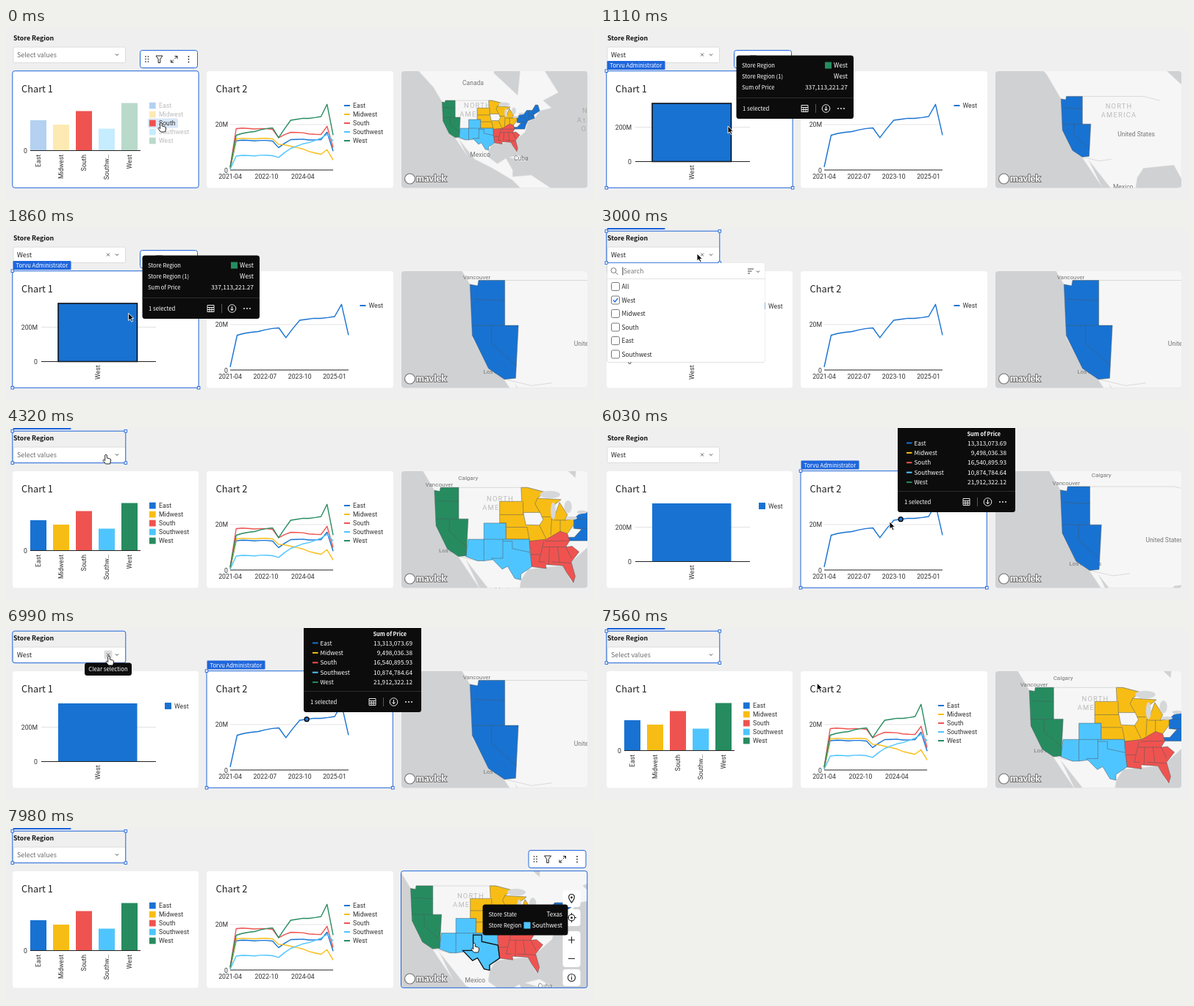
Recreate the animation shown at these times as an HTML page. Size 800x235 px, loop 8000 ms.

```html
<!DOCTYPE html>
<html lang="en">
<head>
<meta charset="utf-8">
<title>Dashboard filters</title>
<style>
html, body { margin: 0; width: 100%; height: 100%; overflow: hidden; background: #efefef; }
svg { display: block; width: 800px; height: 235px; }
text { font-family: "Noto Sans CJK SC", "Noto Sans CJK JP", "Noto Sans CJK", "Noto Sans", sans-serif; }
.r { font-family: Roboto, Arial, sans-serif; }
</style>
</head>
<body>
<svg viewBox="0 0 800 235">
  <defs><clipPath id="mapClip"><rect x="538" y="59" width="253" height="159.5" rx="4"/></clipPath></defs>
  <g id="scene"></g>
</svg>
<script>
const LOOP = 8000, BLUE = '#1f66dc', INK = '#222', DARK = '#0c0c0c';
const END = 'text-anchor="end"', MID = 'text-anchor="middle"', BOLD = 'font-weight="700"';

// Lines bend only at the shared stops (quarters since 2021-04)
const stops = [0, 1, 7, 8, 10, 15, 16, 17];
const regions = [
  { name: 'East', color: '#1872d2', bar: 126, total: '13,313,073.69', line: [192, 153.5, 154, 163.5, 152, 153, 142, 168],
    edge: '-83.7 36.6 -75.9 36.6 -75.2 38.5 -74 40.5 -70 41.6 -70.6 43.1 -67 44.8 -68 47.2 -69.5 47.3 -71.4 45 -74.7 45 -76.3 43.5 -79 43 -80.5 42 -80.5 39.7 -78 39.5 -80.3 37.5 -82 37.5',
    cuts: ['-80 39.7 -75.5 39.7 -74.7 41.3 -75.3 42 -79.7 42', '-73.5 45 -73.5 41', '-73.4 42.7 -70.8 42.8 -71.2 45.2'] },
  { name: 'Midwest', color: '#f8bd14', bar: 132, total: '9,498,036.38', line: [192, 151, 151, 159, 161, 173, 166, 180],
    edge: '-104 46 -97 46 -97.2 49 -95.2 49 -89.6 48 -92 46.7 -84.5 46.4 -87 45 -87.5 41.7 -86.4 43 -85 45.8 -82.5 43 -83.3 41.7 -80.5 42 -80.5 40.6 -82.4 38.5 -89.4 36.5 -94.6 36.5 -94.6 37 -102 37 -102 41 -104 41',
    cuts: ['-104 43 -96.5 43 -96.6 46', '-102 40 -95.3 40 -94.6 37', '-92 46.7 -92.8 45.5 -91.2 43.5', '-90.6 42.5 -87.8 42.5', '-91.4 40.5 -89.2 37', '-87.5 41.7 -87.8 38', '-84.8 41.7 -84.8 39', '-87 41.7 -83 41.7'] },
  { name: 'South', color: '#ef5350', bar: 113.5, total: '16,540,895.93', line: [190, 137, 138, 150, 142, 146, 134, 163],
    edge: '-94.6 36.5 -89.2 37 -84.8 39 -82.5 38.4 -81.8 36.6 -83 35 -81 35.2 -78.8 33.7 -81.3 31 -80 27 -80.6 25.2 -82.7 28 -84 30 -89.4 30.3 -89.2 29.2 -93.8 29.7',
    cuts: ['-94.4 33 -91.1 33', '-90 36.5 -91.5 31 -89.7 31', '-90.3 35 -83 35', '-89.5 36.5 -82 36.6', '-88.2 35 -88.4 30.3', '-85.6 35 -85 31', '-87.5 31 -81.3 30.7', '-83 35 -81.2 32'] },
  { name: 'Southwest', color: '#4fc5ff', bar: 137.5, total: '10,874,784.64', line: [193, 174.5, 174, 177, 164, 151, 145, 154],
    edge: '-114 37 -109 37 -109 41 -102 41 -102 37 -94.6 37 -94.4 33.6 -103 32 -109 31.3 -111 31.3 -114.8 32.5',
    cuts: ['-102 37 -109 37 -109 31.3', '-103 37 -103 36.5'] },
  { name: 'West', color: '#268c5f', bar: 102.5, total: '21,912,322.12', line: [190, 146, 136, 150, 125.5, 121.5, 104, 146],
    edge: '-124.7 48.4 -123 48.2 -122.8 49 -117 49 -117 42 -114 42 -114.6 32.7 -117.1 32.5 -120.6 34.5 -124.2 40.3',
    cuts: ['-124 46.2 -119 46 -117 46', '-124.3 42 -117 42', '-120 42 -120 39 -114.4 35'] }
];
const WEST = regions[4], AQUA = regions[3].color, FILTERED = regions[0].color;
const texas = '-103 36.5 -100 36.5 -100 34.6 -94.4 33.6 -93.8 29.7 -97.3 27.6 -97.3 26 -99.2 26.4 -101.5 29.8 -103.2 29 -106.6 32 -103 32';
const iowa = '-96.5 43.5 -91.2 43.5 -90.2 41.8 -91.4 40.5 -95.7 40.6';
const land = '-158 57 -152 60 -140 60 -130 54 -124.7 48.4 -124.2 40 -120.6 34.5 -117.2 32.5 -110 23 -114.7 31.5 -105.5 21 -95 16 -83 9 -78 4 -60 4 -72 12 -83 11 -83 15 -87 21.5 -92 18.5 -97.8 22.5 -97.2 26 -95 29 -84 30 -81 25.2 -81.3 31 -75.6 35.3 -74 40 -70 41.5 -67 44.8 -60 46 -65 49 -56 52 -65 60 -78 62 -80 51 -94 58.5 -95 72 -130 70';
const cuba = '-85 22 -80 23.2 -74.5 20.2 -78 20';
const borders = ['-122.8 49 -95 49 -89 48', '-117 32.5 -111 31.3 -106.6 31.8'];
const lakes = [[-88, 47.5, 3.2, .9], [-87, 43.9, .8, 2], [-82.3, 44.8, 1.2, 1.5], [-81.2, 42.2, 1.8, .4], [-77.9, 43.6, 1.6, .4]];

const rect = (x, y, w, h, fill, more = '') => `<rect x="${x}" y="${y}" width="${w}" height="${h}" fill="${fill}" ${more}/>`;
const text = (x, y, s, size, fill = INK, more = '') => `<text x="${x}" y="${y}" font-size="${size}" fill="${fill}" ${more}>${s}</text>`;
const path = (d, stroke, w = 1, fill = 'none', more = '') => `<path d="${d}" stroke="${stroke}" stroke-width="${w}" fill="${fill}" ${more}/>`;
const dot = (x, y, r, fill, more = '') => `<circle cx="${x}" cy="${y}" r="${r}" fill="${fill}" ${more}/>`;
const dots = (n, x, y, dx, dy, fill) => Array.from({ length: n }, (_, i) => dot(x + i * dx, y + i * dy, .9, fill)).join('');
const chart = (x, y, s, more = '', fill = '#333', size = 8.7) => text(x, y, s, size, fill, 'class="r" ' + more);
const chevron = (x, y) => path(`M${x - 2} ${y - 1}l2 2 2 -2`, '#444');
const box = (x, y, w, h) => rect(x, y, w, h, DARK, 'rx="3.5"');

const linear = u => u;
const smooth = u => u * u * (3 - 2 * u);
const easeOut = u => 1 - (1 - u) ** 3;
// Eased interpolation over rows of [time, ...values]
function track(keys, t, ease) {
  let i = 0;
  while (i < keys.length - 2 && t >= keys[i + 1][0]) i++;
  const [a, b] = [keys[i], keys[i + 1]];
  const u = ease(Math.min(1, Math.max(0, (t - a[0]) / (b[0] - a[0]))));
  return a.slice(1).map((v, n) => v + (b[n + 1] - v) * u);
}

function outline(x, y, w, h, handles) {
  let s = rect(x, y, w, h, 'none', `rx="${handles ? 0 : 3}" stroke="${BLUE}"`);
  if (handles) for (const a of [x, x + w]) for (const b of [y, y + h])
    s += rect(a - 1.8, b - 1.8, 3.6, 3.6, '#fff', `stroke="${BLUE}" stroke-width=".9"`);
  return s;
}
const card = (x, handles) => outline(x, 58.7, 253.3, 159.6, handles);
const tag = (x, y) => rect(x, y, 79, 12, BLUE, 'rx="1"') + text(x + 4, y + 9, 'Torvu Administrator', 7.6, '#fff');

function toolbar(x) {
  return rect(x, 30.5, 78, 24, '#fff', `rx="3" stroke="${BLUE}"`) +
    dots(3, x + 7.5, 39, 0, 3.5, '#555') + dots(3, x + 11, 39, 0, 3.5, '#555') +
    path(`M${x + 21.5} 38h9l-3.2 4.5v5h-2.6v-5z`, INK) +
    path(`M${x + 47} 38.5h3.5v3.5m0 -3.5l-3.5 3.5M${x + 42} 43.5v3.5h3.5m-3.5 0l3.5 -3.5`, INK) +
    dots(3, x + 66, 39, 0, 3.7, INK);
}

function footer(x, y) {
  return rect(x, y - 18, 160, .6, '#444') + text(x + 9, y, '1 selected', 7.8, '#fff') +
    path(`M${x + 89} ${y - 7.5}h9v9h-9zm0 3h9m-9 3h9m-6 -3v6m3 -6v6`, '#fff', .9) +
    rect(x + 108, y - 9, .7, 12, '#777') + dot(x + 122.5, y - 3, 5.3, 'none', 'stroke="#fff" stroke-width=".9"') +
    path(`M${x + 122.5} ${y - 6}v5.5m-2.2 -2l2.2 2 2.2 -2`, '#fff') + dots(3, x + 139, y - 3, 4, 0, '#fff');
}

function barTip(pinned) {
  let s = box(185.5, 37.5, 159.5, pinned ? 86.5 : 52) + rect(306, 46.5, 9, 9, WEST.color);
  [['Store Region', 'West'], ['Store Region (1)', 'West'], ['Sum of Price', '337,113,221.27']].forEach(([k, v], i) => {
    const y = 54 + i * 14.8;
    s += text(193, y, k, 7.6, '#fff') + text(337, y, v, 8.4, '#fff', END);
  });
  return s + (pinned ? footer(185, 113) : '');
}

function lineTip(pinned) {
  const dy = pinned ? -30 : 0, w = pinned ? 160 : 136;
  let s = box(405, 8 + dy, w, pinned ? 137 : 109);
  s += text(417, 22 + dy, 'Quarter of Date', 7.4, '#fff', BOLD) + text(478, 22 + dy, '2024-01', 8.2, '#fff');
  s += text(385 + w, 41 + dy, 'Sum of Price', 7.4, '#fff', BOLD + ' ' + END);
  regions.forEach((r, i) => {
    const y = 53.5 + dy + i * 13.4;
    s += rect(417, y - 4, 7.5, 2, r.color) + text(427.5, y, r.name, 8.1, '#fff') + text(393 + w, y, r.total, 8.3, '#fff', END);
  });
  return s + (pinned ? footer(405, 104) : '');
}

function barChart(west, legendHover, picked) {
  let s = text(21, 88, 'Chart 1', 12.8);
  const label = (x, y, n) => chart(0, 0, n, `${END} transform="translate(${x} ${y}) rotate(-90)"`);
  if (west) return s + rect(48, 135, 156, .8, '#ddd') + chart(43, 138.5, '200M', END) + chart(43, 185.5, '0', END) +
    rect(71, 103, 107.5, 79.5, FILTERED, picked ? 'stroke="#080808" stroke-width="1.5"' : '') +
    rect(48, 182, 156, 1, INK) + label(128, 187.5, 'West') + rect(216, 102, 9, 9, FILTERED) + chart(229, 109.5, 'West');
  regions.forEach((r, i) => {
    const x = 33 + i * 31, y = 106 + i * 12, lit = legendHover && r.name === 'South';
    const o = legendHover && !lit ? 'opacity=".32"' : '';
    s += rect(x, r.bar, 22, 167.5 - r.bar, r.color, o) + label(x + 14, 173, r.name.length > 8 ? 'Southw…' : r.name);
    if (lit) s += rect(193, y - 6.5, 41, 13, '#d8e7f8', 'rx="2"');
    s += rect(195, y - 4.3, 8.7, 8.7, r.color, o) + chart(208, y + 3.2, r.name, o);
  });
  return s + rect(33, 167, 150, 1, INK) + chart(29, 171, '0', END);
}

function lineChart(west, hover, picked) {
  const step = west ? 9.47 : 8.24, span = step * 17, X = i => 305 + i * step;
  let s = text(285.5, 88, 'Chart 2', 12.8);
  s += rect(305, 131.5, span, .8, '#ddd') + chart(302, 135, '20M', END) + chart(302, 197.5, '0', END) + rect(305, 193.5, span, 1, INK);
  const ticks = west ? ['2021-04', '2022-07', '2023-10', '2025-01'] : ['2021-04', '2022-10', '2024-04'];
  ticks.forEach((d, i) => s += chart(X(i * (west ? 5 : 6)), 206, d, MID));
  if (hover) s += rect(395.2, 100, .9, 94, '#666');
  regions.forEach((r, i) => {
    if (west && r !== WEST) return;
    const keys = stops.map((q, n) => [q, r.line[n]]), Y = q => track(keys, q, linear)[0] + .5 * Math.sin(q * 2);
    const c = west ? FILTERED : r.color, y = west ? 106 : 106 + i * 12, lx = west ? 481.5 : 460;
    const pts = Array.from({ length: 18 }, (_, q) => X(q).toFixed(1) + ' ' + Y(q).toFixed(1));
    s += path('M' + pts.join('L'), c, 1.4, 'none', 'stroke-linejoin="round"');
    s += rect(lx, y - 1, 8, 2, c) + chart(lx + 12, y + 3.2, r.name);
    if (hover) s += dot(X(11), Y(11), 3.3, c);
    if (picked) s += dot(X(11), Y(11), 3, c, 'stroke="#000" stroke-width="1.3"');
  });
  return s;
}

// Camera: zoomed-out poses fly to the west coast as depth goes from 0 to 1
const wide = { k: 2.3, lon: -93.8, m: 39 }, full = { k: 3.92, lon: -95.62, m: 41.06 }, coast = { k: 6.15, lon: -119.3, m: 45.4 };
const depthKeys = [[970, 0], [1650, 1], [4000, 1], [4770, 0], [5860, 0], [6460, 1], [7340, 1], [7880, 0]];
function camera(t) {
  const from = t < 2000 ? wide : full, [p] = track(depthKeys, t, easeOut), pan = 1 - (1 - p) ** 2.5;
  return {
    k: from.k * (coast.k / from.k) ** p,
    lon: from.lon + (coast.lon - from.lon) * pan,
    m: from.m + (coast.m - from.m) * pan
  };
}
const merc = d => Math.log(Math.tan((45 + d / 2) * Math.PI / 180)) * 180 / Math.PI;

function mapView(t, west, hover) {
  const { k, lon, m } = camera(t);
  const X = l => +(664.5 + (l - lon) * k).toFixed(1), Y = lat => +(139 - (merc(lat) - m) * k).toFixed(1);
  const line = str => 'M' + str.replace(/(\S+) (\S+)/g, (_, l, lat) => X(+l) + ' ' + Y(+lat));
  const shape = str => line(str) + 'Z';
  const place = (l, lat, name, size = 8.5, fill = '#777', more = '', dy = 0) => chart(X(l), Y(lat) + dy, name, MID + ' ' + more, fill, size);

  let s = rect(538, 59, 253, 160, '#d0d1d3') + path(shape(land) + shape(cuba), '#dedede', .5, '#f6f6f6');
  s += path(borders.map(line).join(''), '#d2d2d2', .8);
  if (k < 4.7) ['NORTH', 'AMERICA'].forEach((w, i) => s += place(-103.8, 46, w, 9.4, '#bbb', 'letter-spacing="1.2"', i * 12));
  if (k > 3) s += place(-97.6, 38.5, 'United States', 8.5);
  s += place(-102.3, 22.2, 'Mexico');
  if (k < 4) s += place(-78, 20.2, 'Cuba') + place(-106.4, 54.7, 'Canada');
  if (k < 3) ['North', 'Atlantic', 'Ocean'].forEach((w, i) => s += place(-34.5, 43.8, w, 9.4, '#aaa', 'letter-spacing="2"', i * 12.5));
  if (k > 4.2) s += place(-123.2, 49.2, 'Vancouver', 8) + place(-118.2, 33.6, 'Los Angeles', 8) + place(-114, 50.6, 'Calgary', 8);

  const fillRegion = (d, fill) => path(d, '#4a565c', .5, fill, 'stroke-linejoin="round"');
  for (const r of west ? [WEST] : regions)
    s += fillRegion(shape(r.edge), west ? FILTERED : r.color) + fillRegion(r.cuts.map(line).join(''), 'none');
  if (!west) {
    s += fillRegion(shape(texas), AQUA) + fillRegion(shape(iowa), '#f6f6f6');
    if (hover) s += path(shape(texas), '#111', 1.3);
    for (const [l, lat, rx, ry] of lakes)
      s += `<ellipse cx="${X(l)}" cy="${Y(lat)}" rx="${rx * k}" ry="${ry * k * 1.35}" fill="#d6d7d9"/>`;
  }
  s += dot(549.5, 206, 7, '#fff', 'stroke="#777" stroke-width="1.2"');
  s += text(558, 210.3, 'mavlek', 13, '#fff', `${BOLD} stroke="#777" stroke-width="2" paint-order="stroke" style="font-family:Lato,sans-serif"`);
  return `<g clip-path="url(#mapClip)">${s}</g>`;
}

function mapControls() {
  let s = '';
  for (const [y, h] of [[85, 23], [111, 23], [141, 49], [193, 23]]) s += rect(757.5, y, 24, h, '#fff', 'rx="4"');
  const ring = (y, r) => dot(769.5, y, r, 'none', `stroke="${INK}" stroke-width="1.1"`);
  s += path('M769.5 102c-6 -7 -4 -11.5 0 -11.5s6 4.5 0 11.5z', INK, 1.2) + dot(769.5, 95, 1.4, INK);
  s += ring(122.5, 4.3) + dot(769.5, 122.5, 1.5, INK) + ring(204.5, 5);
  return s + path('M769.5 116v2.5m0 8v2.5m-6.5 -6.5h2.5m8 0h2.5M765 153h9m-4.5 -4.5v9M765 178.5h9M769.5 203.5v4m0 -6v1', INK, 1.2);
}

function stateTip() {
  return box(648.5, 104.5, 116, 42) + rect(704.5, 128.5, 9, 9, AQUA) +
    text(656.5, 121, 'Store State', 7.6, '#fff') + text(757, 121, 'Texas', 8.3, '#fff', END) +
    text(656.5, 136, 'Store Region', 7.6, '#fff') + text(757, 136, 'Southwest', 8.3, '#fff', END);
}

function filterBox(west, clearHover) {
  let s = text(10, 17, 'Store Region', 8.8, '#111', BOLD) + rect(10, 26, 152.5, 21.5, '#fff', 'rx="2" stroke="#dcdcdc"');
  s += text(15, 39.7, west ? 'West' : 'Select values', 8.9, west ? INK : '#6a6a6a') + chevron(151, 36.5);
  if (clearHover) s += rect(133.5, 30.5, 11, 12, '#ddd', 'rx="2"');
  return s + (west ? path('M137 34.5l4 4m0 -4l-4 4', '#555', .9) : '');
}

function menu() {
  let s = rect(9, 48, 216, 136, '#000', 'rx="4" opacity=".12"') + rect(10, 48, 214.5, 135, '#fff', 'rx="3"');
  s += dot(18.5, 58, 3.5, 'none', 'stroke="#777"') + path('M21 60.5l3.5 3.5', '#777') + rect(30.5, 53.5, .9, 11, INK) + text(32, 62, 'Search', 8.6, '#777');
  s += path('M201 56h8m-8 3h5.5m-5.5 3h3', '#444', 1.1) + chevron(215, 59.5) + rect(10, 69, 214.5, .8, '#ddd');
  ['All', 'West', 'Midwest', 'South', 'East', 'Southwest'].forEach((n, i) => {
    const y = 80 + i * 18.5;
    s += rect(15.5, y - 5.5, 11, 11, '#fff', 'rx="2" stroke="#777"') + text(29.5, y + 3, n, 8.3);
    if (n === 'West') s += path(`M18 ${y}l2.3 2.5 4 -5`, BLUE, 1.3);
  });
  return s;
}

const pointer = [
  [120, 211, 129], [600, 168, 128], [900, 174, 134], [1700, 174, 134], [2300, 132, 35], [3400, 132, 35], [3680, 136, 36],
  [4780, 136, 36], [5300, 394, 128], [6500, 394, 128], [6920, 140, 38], [7360, 140, 38], [7900, 637, 157]
];
function cursor(t, hand) {
  const [x, y] = track(pointer, t, smooth);
  const d = hand ? 'M-1.3 1Q0 -1 1.3 1V5L5.5 6Q7 6.5 6.5 9L5.5 13H-.5L-4 8.5Q-4 6 -1.3 8.5Z' : 'M0 0V10L2.4 7.9 4.2 11.7 6 10.9 4.2 7.2H7.3Z';
  return path(d, hand ? '#111' : '#fff', .9, hand ? '#fff' : '#000', `transform="translate(${x.toFixed(1)} ${y.toFixed(1)})"`);
}

const scene = document.getElementById('scene');
function draw(t) {
  const within = (a, b) => t >= a && t < b;
  const west = within(930, 4000) || within(5840, 7330);
  const barPicked = within(860, 2580), linePicked = within(5720, 7330), lineHover = within(5220, 5720);
  const boxPicked = within(2580, 5720) || t >= 7330, boxHover = within(2250, 2580) || within(6780, 7330);
  const clearHover = within(3640, 4000) || within(6860, 7330);
  const mapHover = t >= 7760, stateHover = t >= 7880;
  const hand = t < 220 || within(3600, 4850) || within(5200, 5800) || within(6850, 7420) || t >= 7800;

  let s = rect(0, 0, 800, 235, '#efefef') + rect(9, 59, 253, 159.5, '#fff', 'rx="4"') + rect(273, 59, 254, 159.5, '#fff', 'rx="4"');
  s += barChart(west, t < 220, barPicked) + lineChart(west, lineHover, linePicked) + mapView(t, west, stateHover) + filterBox(west, clearHover);

  if (t < 2580) s += card(8.8, barPicked);
  if (t < 1950) s += toolbar(182.5);
  if (barPicked) s += tag(9.5, 45);
  if (within(5080, 5720)) s += card(273, false) + toolbar(447.5);
  if (linePicked) s += card(273, true) + tag(273.5, 44.5);
  if (boxPicked) s += tag(9.5, -10);
  if (boxPicked || boxHover) s += outline(8.8, 4.2, 154, 43.5, boxPicked);
  if (mapHover) s += card(537.5, false) + toolbar(711) + mapControls();

  if (within(480, 2580)) s += barTip(barPicked);
  if (lineHover || linePicked) s += lineTip(linePicked);
  if (stateHover) s += stateTip();
  if (within(2640, 3350)) s += menu();
  if (clearHover) s += box(107, 47.5, 64, 17.5) + text(139, 59.3, 'Clear selection', 7.8, '#fff', MID);
  scene.innerHTML = s + cursor(t, hand);
}

const start = performance.now();
function tick() {
  draw((performance.now() - start) % LOOP);
  requestAnimationFrame(tick);
}
tick();
</script>
</body>
</html>
```
